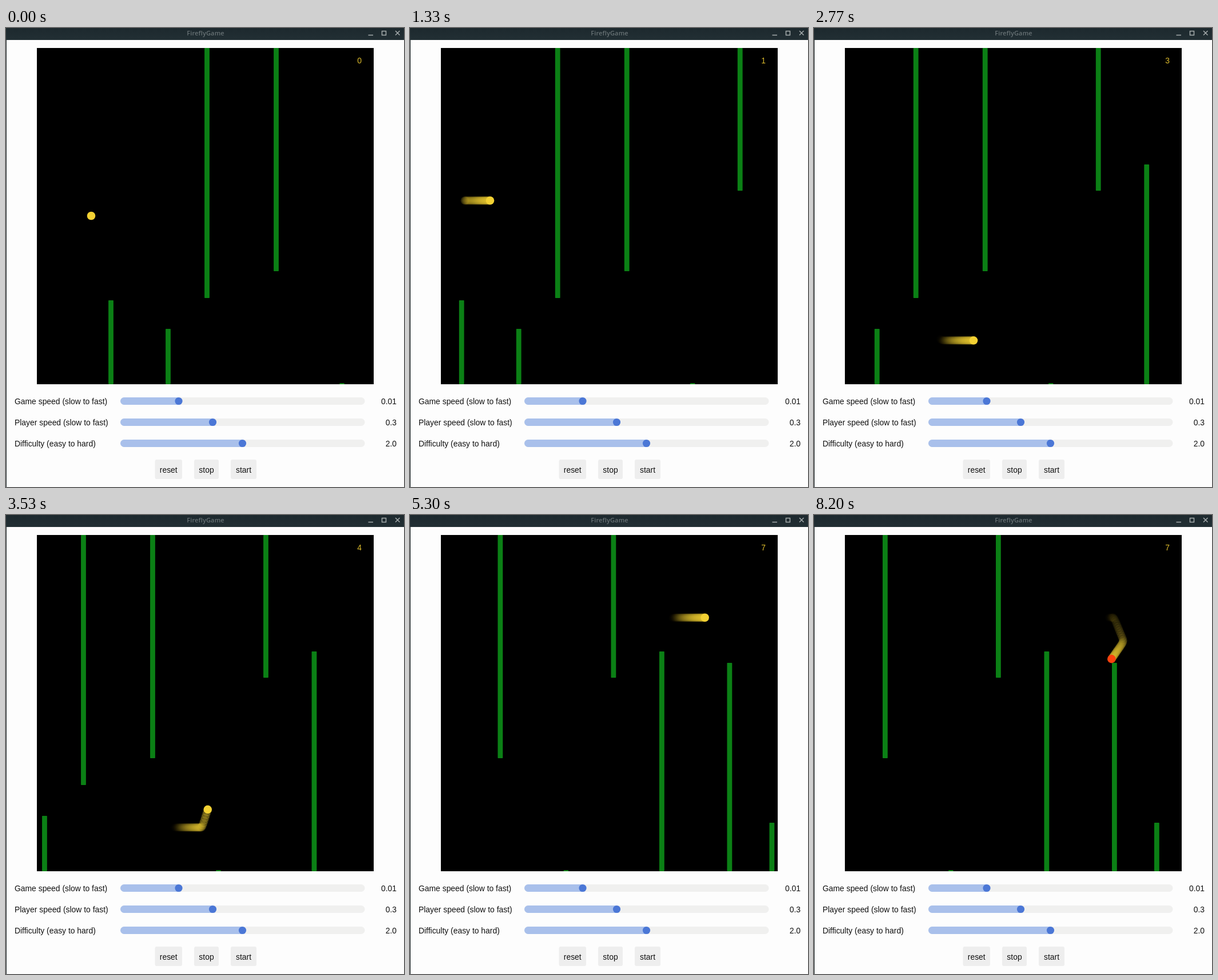
These frames come from a looping animation (696x804 px, 8.33 s). An HTML page with a canvas:

```html
<!DOCTYPE html>
<html lang="en">
<head>
<meta charset="utf-8">
<title>FireflyGame</title>
<style>
html, body { margin: 0; width: 100%; height: 100%; overflow: hidden; background: #fdfdfd; }
canvas { display: block; }
</style>
</head>
<body>
<canvas id="stage" width="696" height="804"></canvas>
<script>
const ctx = document.getElementById('stage').getContext('2d');
const LOOP = 8330, FPS = 30, CRASH = 5.9;
const FIELD = { x: 54, y: 35, w: 589, h: 589 };
const YELLOW = '#f3d133', BAR_W = 8.8, BALL_R = 7.3;
const SANS = '13.9px "Liberation Sans", Arial, sans-serif';

// [x, length]; a negative length hangs from the top
const bars = [
  [183.5, 147], [283.5, 97], [351.5, -438], [472.5, -391], [587.5, 2],
  [670.5, -250], [755, 385], [873.5, 365], [947.5, 85]
];

// steering: from this second on, the share of full speed across and down
const steering = [
  [0.3, -1, -1], [0.38, -1, 0], [0.865, 1, 0], [1.45, 1, 1], [2.175, 1, 0],
  [3.43, 0.94, -0.87], [4.68, 0.97, 0], [5.4, 0.97, 0.69], [5.58, -0.68, 0.28]
];
const SPEED_X = 97, SPEED_Y = 338, EASE = 0.02, STEP = 1 / 480;

function scroll(t) {
  return t === 0 ? 0 : 93.1 + 55.8 * (t - 1.33);
}

// the whole flight, with the velocity easing towards the steering
function fly() {
  const path = [];
  let x = 149, y = 329, vx = 0, vy = 0;
  for (let t = 0; t <= CRASH + EASE + STEP; t += STEP) {
    const [, dx, dy] = steering.findLast(s => s[0] <= t) || [0, 0, 0];
    vx += (dx * SPEED_X - vx) * STEP / EASE;
    vy += (dy * SPEED_Y - vy) * STEP / EASE;
    x += vx * STEP;
    y += vy * STEP;
    path.push([x, y]);
  }
  return path;
}
const path = fly();

function firefly(t) {
  if (t <= 0) return path[0];
  const i = Math.round((t + EASE) / STEP);
  return path[Math.min(i, path.length - 1)];
}

// a bar counts once the firefly has been ahead of it
function score(t) {
  let reach = 0;
  for (let s = 0; s <= t; s += 1 / FPS) reach = Math.max(reach, firefly(s)[0] + scroll(s));
  return bars.filter(([x]) => x < reach).length;
}

function rect(x, y, w, h, color, r = 0) {
  ctx.fillStyle = color;
  ctx.beginPath();
  ctx.roundRect(x, y, w, h, r);
  ctx.fill();
}

function disc(x, y, r, color) {
  ctx.fillStyle = color;
  ctx.beginPath();
  ctx.arc(x, y, r, 0, Math.PI * 2);
  ctx.fill();
}

function text(str, x, y, color = '#111', align = 'left', font = SANS) {
  ctx.font = font;
  ctx.textAlign = align;
  ctx.fillStyle = color;
  ctx.fillText(str, x, y);
}

function titleBar() {
  const g = ctx.createLinearGradient(0, 0, 0, 21);
  g.addColorStop(0, '#1d292e');
  g.addColorStop(1, '#222f34');
  rect(0, 0, 696, 21, g);
  ctx.letterSpacing = '0.15px';
  text('FireflyGame', 349, 13, '#687275', 'center', '600 11px "Open Sans", "Noto Sans", sans-serif');
  ctx.letterSpacing = '0px';
  ctx.strokeStyle = '#a5abac';
  ctx.lineWidth = 1.5;
  ctx.beginPath();
  ctx.moveTo(633.5, 12.5); ctx.lineTo(642, 12.5);
  ctx.rect(657.5, 5.5, 7, 7);
  ctx.moveTo(681, 5); ctx.lineTo(688.5, 12.5);
  ctx.moveTo(688.5, 5); ctx.lineTo(681, 12.5);
  ctx.stroke();
}

function slider(label, value, y, knob) {
  text(label, 15, y + 5);
  rect(200, y - 6.5, 427.5, 13, '#f0f0ef', 6.5);
  rect(200, y - 6.5, knob - 200, 13, '#a9c0eb', [6.5, 0, 0, 6.5]);
  disc(knob, y, 6.6, '#4b77d6');
  text(value, 683, y + 5, '#111', 'right');
}

function button(label, x, w) {
  rect(x, 756, w, 34, '#eeeeee', 3);
  text(label, x + w / 2, 779, '#111', 'center');
}

function drawBar(x, length) {
  const y = length < 0 ? FIELD.y : FIELD.y + FIELD.h - length;
  rect(x - BAR_W / 2, y, BAR_W, Math.abs(length), '#0b8015', 0.8);
}

function trail(t) {
  const n = 36;
  for (let i = n; i > 0; i--) {
    const past = t - i / 60;
    if (past < steering[0][0]) continue;
    ctx.globalAlpha = 0.26 * (1 - i / (n + 1));
    disc(...firefly(past), BALL_R, YELLOW);
  }
  ctx.globalAlpha = 1;
}

function game(t) {
  const now = Math.min(t, CRASH), shift = scroll(now);
  ctx.save();
  ctx.beginPath();
  ctx.rect(FIELD.x, FIELD.y, FIELD.w, FIELD.h);
  ctx.clip();
  rect(FIELD.x, FIELD.y, FIELD.w, FIELD.h, '#000');
  for (const [x, length] of bars) drawBar(x - shift, length);
  trail(now);
  disc(...firefly(now), BALL_R, t >= CRASH ? '#fc420e' : YELLOW);
  text(String(score(now)), 622, 62, '#dcbb2c', 'right');
  ctx.restore();
}

function draw(ms) {
  const t = Math.floor((ms + 5) * FPS / 1000) / FPS;
  rect(0, 0, 696, 804, '#fdfdfd');
  titleBar();
  rect(0, 21, 1, 783, '#252d30');
  game(t);
  slider('Game speed (slow to fast)', '0.01', 653.5, 302);
  slider('Player speed (slow to fast)', '0.3', 690.5, 361.5);
  slider('Difficulty (easy to hard)', '2.0', 727.5, 413.5);
  button('reset', 260.5, 47.5);
  button('stop', 329, 43);
  button('start', 393, 45);
}

const start = performance.now();
function frame() {
  draw((performance.now() - start) % LOOP);
  requestAnimationFrame(frame);
}
frame();
</script>
</body>
</html>
```
